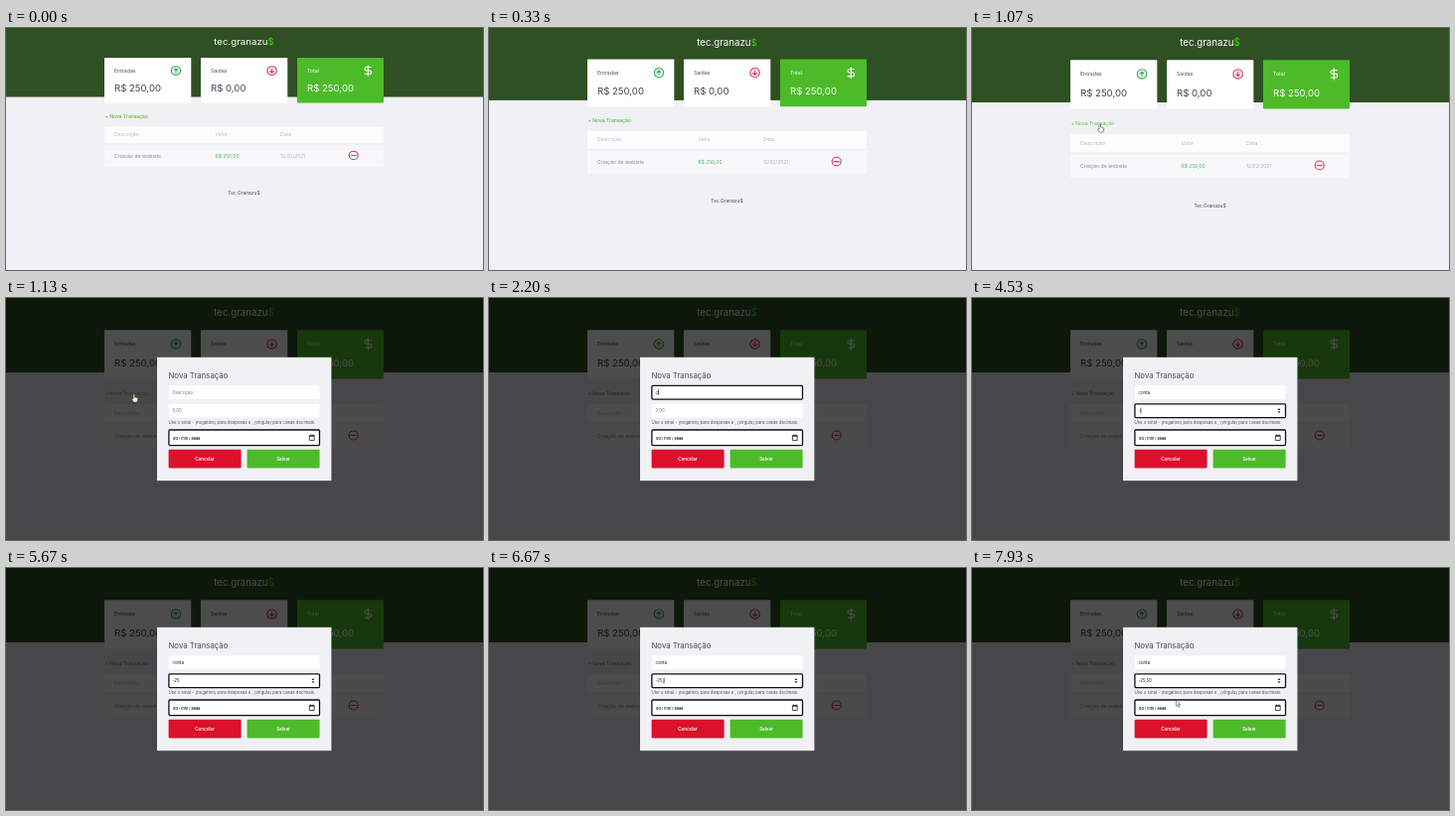
Recreate the animation shown at these times as an HTML page. Size 480 by 244 pixels, loop 8 s.

```html
<!DOCTYPE html>
<html lang="pt-BR">
<head>
<meta charset="utf-8">
<title>Controle financeiro</title>
<style>
  html, body { margin: 0; width: 100%; height: 100%; overflow: hidden; background: #f0f0f5; }
  svg { display: block; width: 100vw; height: 100vh; }
  text { font-family: Inter, "Open Sans", sans-serif; font-size: 5.2px; fill: #4c4e57; }
  .value { font-size: 9.6px; fill: #363f5f; fill: #41434d; }
  .white { fill: #fff; }
  .faint { fill: #b9bbc6; }
  .soft { fill: #85868f; }
  .middle { text-anchor: middle; }
  .input { font-size: 4.3px; fill: #111; }
  .hint { fill: #777; }
  .button { font-size: 4.5px; font-weight: 600; fill: #fff; text-anchor: middle; }
  .line { fill: none; stroke-width: 1.1; stroke-linecap: round; stroke-linejoin: round; }
  .ring { fill: #fff; stroke: #101010; stroke-width: 1.3; }
</style>
</head>
<body>
<svg viewBox="0 0 480 244" preserveAspectRatio="none">
  <defs>
    <g id="circleArrow" class="line">
      <circle r="4.7"/>
      <path d="M0 2.3V-2.3M-2-.3L0-2.3L2-.3"/>
    </g>
  </defs>

  <rect width="480" height="244" fill="#f0f0f5"/>
  <g id="page">
    <rect width="480" height="75" fill="#2f5023"/>
    <text class="white middle" x="239.5" y="18.3" style="font-size:9.7px">tec.granazu<tspan fill="#3dd705">$</tspan></text>

    <rect x="99" y="32.3" width="87.3" height="49.2" rx="1" fill="#fff"/>
    <text x="109" y="48.4">Entradas</text>
    <text class="value" x="109" y="69.3">R$ 250,00</text>
    <use href="#circleArrow" x="171" y="46.4" stroke="#2fa84f"/>

    <rect x="196" y="32.3" width="87.3" height="49.2" rx="1" fill="#fff"/>
    <text x="206" y="48.4">Saídas</text>
    <text class="value" x="206" y="69.3">R$ 0,00</text>
    <use href="#circleArrow" stroke="#d9325c" transform="translate(267.6 46.4) rotate(180)"/>

    <rect x="293" y="32.3" width="87" height="49.2" rx="1" fill="#4dbb29"/>
    <text class="white" x="303" y="48.4">Total</text>
    <text class="value white" x="303" y="69.3">R$ 250,00</text>
    <path class="line" stroke="#fff" d="M364.3 40.7V52M367.4 42.7H362.8a1.8 1.8 0 0 0 0 3.6h3a1.8 1.8 0 0 1 0 3.7h-4.7"/>

    <text id="newLink" x="99.5" y="98" style="font-size:5.05px">+ Nova Transação</text>

    <rect x="99" y="107" width="281" height="18.3" rx="1" fill="#fcfcfd"/>
    <text class="faint" x="109" y="117.8">Descrição</text>
    <text class="faint" x="210.5" y="117.8">Valor</text>
    <text class="faint" x="276" y="117.8">Data</text>

    <rect x="99" y="127.5" width="281" height="23.7" rx="1" fill="#f8f8fa"/>
    <text class="soft" x="109" y="141.2">Criação de website</text>
    <text x="210.5" y="141" style="font-size:4.9px;fill:#4daf5b">R$ 250,00</text>
    <text x="276" y="141" style="font-size:4.8px;fill:#acaeb8">12/02/2021</text>
    <g class="line" stroke="#d9325c"><circle cx="349.7" cy="138.5" r="4.5"/><path d="M347.4 138.5h4.6"/></g>

    <text class="middle" x="239.5" y="180.7" style="font-size:4.9px">Tec.Granazu$</text>
  </g>

  <g id="modal">
    <rect width="480" height="244" opacity=".7"/>
    <use href="#dimLink"/>
    <rect x="152" y="59.8" width="175.4" height="124.4" fill="#f0f0f5"/>
    <text x="163.5" y="81.2" style="font-size:7.8px">Nova Transação</text>

    <rect id="nameBox" x="163.9" y="88.3" width="151.6" height="13.8" rx="1"/>
    <text id="name" x="167.5" y="96.8"></text>

    <rect id="amountBox" x="163.9" y="106.8" width="151.6" height="13.8" rx="1"/>
    <text id="amount" x="167.5" y="115.3"></text>
    <path id="spinner" fill="#333" d="M307.5 113L309 111L310.5 113ZM307.5 114.2L309 116.2L310.5 114.2Z"/>
    <text x="163.5" y="126.5" style="font-size:4.35px">Use o sinal - (negativo) para despesas e , (vírgula) para casas decimais.</text>

    <rect class="ring" x="163.9" y="133" width="151.6" height="15.6" rx="1"/>
    <text class="input" x="168" y="142.6" style="font-size:3.85px;font-weight:500">dd / mm / aaaa</text>
    <path fill="none" stroke="#222" stroke-width=".8" d="M305.4 138.5h4.8v5h-4.8zM305.4 139.4h4.8M306.6 137.5v1M309 137.5v1"/>

    <rect x="163.6" y="152.8" width="73" height="18.8" rx="1" fill="#db112b"/>
    <text class="button" x="200" y="163.9">Cancelar</text>
    <rect x="242.6" y="152.8" width="73" height="18.8" rx="1" fill="#4dbb29"/>
    <text class="button" x="279" y="163.9">Salvar</text>
    <rect id="caret" width=".7" height="6" fill="#111"/>
  </g>

  <path id="hand" fill="#fff" stroke="#222" stroke-width=".5" stroke-linejoin="round"
    d="M-1 0Q-.2-.9.5 0V3L3 3.6Q3.9 4 3.6 5L2.9 8H-.6L-2.6 5Q-2.4 4-1 5Z"/>
  <path id="arrow" fill="#fff" stroke="#222" stroke-width=".5" stroke-linejoin="round"
    d="M0 0V6.6L1.4 5.4L2.4 7.6L3.4 7.1L2.5 5H4.2Z"/>
</svg>

<script>
const LOOP = 8000, MODAL_AT = 1130, BLINK = 530;
const el = id => document.getElementById(id);
const show = (id, visible) => { el(id).style.display = visible ? "" : "none"; };
const place = (id, x, y) => el(id).setAttribute("transform", `translate(${x} ${y})`);
const progress = (t, from, to) => Math.min(1, Math.max(0, (t - from) / (to - from)));
const easeOut = p => 1 - (1 - p) ** 2;
const mix = (a, b, p) => a + (b - a) * p;

const fields = [
  { id: "name", hint: "Descrição", focus: 1670, blur: 3870, text: "conta", keys: [2200, 2470, 2670, 2870, 3000] },
  { id: "amount", hint: "0,00", focus: 3870, blur: LOOP, text: "-25,50", keys: [4530, 5000, 5130, 6670, 7130, 7270] }
];

function drawField(field, t) {
  const pressed = field.keys.filter(k => k <= t);
  const label = el(field.id);
  const content = field.text.slice(0, pressed.length);
  label.textContent = content || field.hint;
  label.setAttribute("class", content ? "input" : "input hint");

  const focused = t >= field.focus && t < field.blur;
  const box = el(field.id + "Box");
  box.setAttribute("class", focused ? "ring" : "");
  box.setAttribute("fill", "#fff");
  if (!focused) return;

  const lastEdit = pressed.length ? pressed.at(-1) : field.focus;
  const width = content ? label.getComputedTextLength() : 0;
  el("caret").setAttribute("x", 167.6 + width);
  el("caret").setAttribute("y", +label.getAttribute("y") - 4.8);
  show("caret", Math.floor((t - lastEdit) / BLINK) % 2 === 0);
}

function draw(t) {
  const stretch = mix(0.927, 1, easeOut(progress(t, 0, 870)));
  el("page").setAttribute("transform", `scale(1 ${stretch})`);

  const hover = progress(t, 870, 1000);
  const leave = progress(t, MODAL_AT, 1330);
  const from = [73, 170, 38], lit = [75, 205, 45], rest = [73, 150, 50];
  const color = from.map((c, i) => mix(mix(c, lit[i], hover), rest[i], leave));
  el("newLink").style.fill = `rgb(${color})`;

  const arrive = easeOut(progress(t, 500, 870));
  place("arrow", mix(165, 128, arrive), mix(125, 97, arrive));
  place("hand", mix(129, 150, progress(t, MODAL_AT, 1330)), 97);
  show("hand", t >= 870 && t < 1330);
  show("arrow", (t >= 500 && t < 870) || t >= 7930);
  if (t >= 7930) place("arrow", 205.3, 132.7);

  show("modal", t >= MODAL_AT);
  show("caret", false);
  show("spinner", t >= 3670);
  if (t >= MODAL_AT) fields.forEach(field => drawField(field, t));
}

const start = performance.now();
function tick() {
  draw((performance.now() - start) % LOOP);
  requestAnimationFrame(tick);
}
tick();
</script>
</body>
</html>
```
